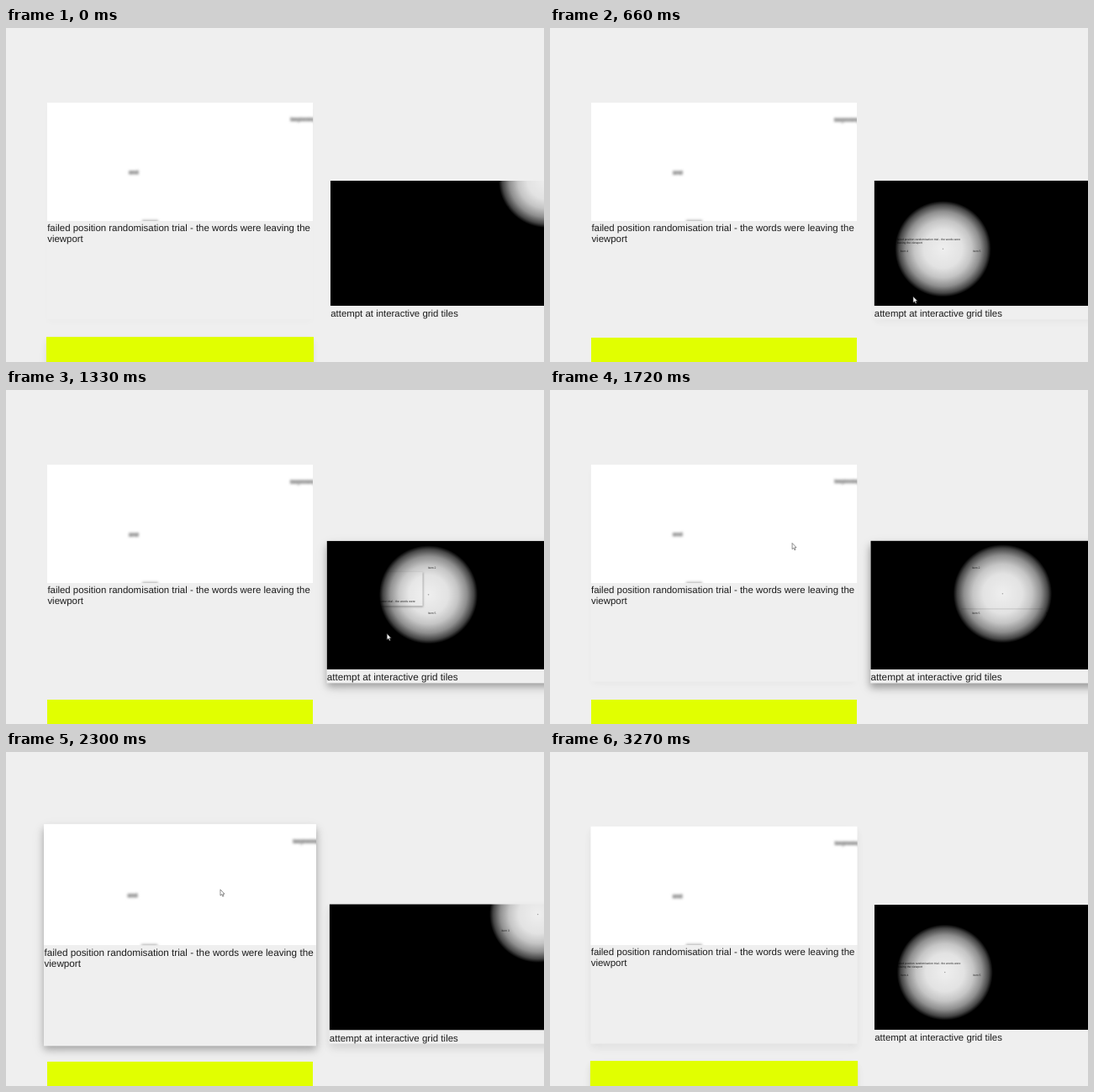
Animation of 640x398 px, one loop 3370 ms. Source, as an HTML page:

```html
<!DOCTYPE html>
<html lang="en">
<head>
<meta charset="utf-8">
<title>Hover cards</title>
<style>
html, body { margin: 0; width: 100%; height: 100%; overflow: hidden; background: #efefef; }
body { position: relative; font: 11.43px/13.2px "Liberation Sans", Arial, sans-serif; color: #1c1c1c; text-rendering: geometricPrecision; }
.card { position: absolute; background: #efefef; }
.card svg { display: block; }
p { position: absolute; margin: 0; white-space: nowrap; }
#left { left: 49px; top: 89px; width: 316px; height: 258px; }
#left p { left: .4px; top: 144.2px; }
#right { left: 386px; top: 182px; width: 317px; height: 165px; }
#right p { left: .2px; top: 152.5px; }
#yellow { left: 49px; top: 369px; width: 316px; height: 258px; background: #e1ff00; }
#pointer { position: absolute; left: 0; top: 0; overflow: visible; fill: #fff; stroke: #444; stroke-width: .6; }
</style>
</head>
<body>
<div class="card" id="yellow"></div>

<div class="card" id="right">
  <svg width="317" height="149" viewBox="386 182 317 149">
    <defs>
      <radialGradient id="spot" gradientUnits="userSpaceOnUse" r="57">
        <stop offset="0" stop-opacity=".03"/>
        <stop offset=".4" stop-opacity=".08"/>
        <stop offset=".6" stop-opacity=".2"/>
        <stop offset=".78" stop-opacity=".42"/>
        <stop offset=".92" stop-opacity=".72"/>
        <stop offset="1"/>
      </radialGradient>
      <filter id="soft"><feGaussianBlur stdDeviation="1"/></filter>
    </defs>
    <rect x="386" y="182" width="317" height="149" fill="#f6f6f6"/>
    <g id="labels" font-size="3.4" fill="#333"></g>
    <g id="mini">
      <rect x="411" y="219" width="86.5" height="39.5" fill="#999" filter="url(#soft)"/>
      <rect x="410" y="218" width="87" height="39.5" fill="#fafafa"/>
    </g>
    <g id="note" font-size="3.4" fill="#222">
      <text x="413" y="253">failed position randomisation trial - the words were</text>
      <text x="413" y="257">leaving the viewport</text>
    </g>
    <path id="rule" d="M491 261H585" stroke="#bbb" stroke-width=".6"/>
    <circle id="dot" r=".8" fill="#aaa"/>
    <rect x="386" y="182" width="317" height="149" fill="url(#spot)"/>
  </svg>
  <p>attempt at interactive grid tiles</p>
</div>

<div class="card" id="left">
  <svg width="316" height="141" viewBox="49 89 316 141">
    <defs><filter id="blur" x="-50%" y="-100%" width="200%" height="300%"><feGaussianBlur stdDeviation="1.4"/></filter></defs>
    <rect x="49" y="89" width="316" height="141" fill="#fff"/>
    <g filter="url(#blur)" font-size="7" fill="#777">
      <path d="M338 109.2H368M146 172.3H158M162 231H181" stroke="#b4b4b4" stroke-width="4.6"/>
      <text x="338" y="111.5">beginning</text>
      <text x="146" y="174.5">and</text>
    </g>
  </svg>
  <p>failed position randomisation trial - the words were leaving the<br>viewport</p>
</div>

<svg id="pointer" width="10" height="12">
  <path id="arrow" d="M0 0V7.2L1.7 5.7L2.8 8.3L4 7.8L2.9 5.3H5Z"/>
  <path id="hand" d="M-.7 0Q0-1 .8 0V3L3 3.7V6L2 8.5H-1.2L-3 5.3L-2.3 4.5L-.7 5.5Z"/>
</svg>

<script>
const LOOP = 3370, CLIP = 2610, STEP = 95.8, EASE = 1000, GROWTH = .03;
const $ = id => document.getElementById(id);

// When the pointer enters and leaves each card
const hovers = { left: [1550, 2500], right: [490, 1650], yellow: [2670, 2830] };

// Key points: [time, x, y]
const spotPath = [[0, 643, 181], [270, 588.5, 215], [660, 468.5, 263], [1330, 503, 244.6], [1720, 538, 243.6], [2300, 632, 194], [CLIP, 643, 181]];
const pointerPath = [[660, 432, 320], [1330, 455, 292], [1720, 289, 183], [2300, 255, 164], [2880, 333, 387]];

function smooth(u) {
  u = Math.min(1, Math.max(0, u));
  return u * u * (3 - 2 * u);
}
const pulse = (t, from, to, length) => smooth((t - from) / length) - smooth((t - to) / length);

// Point on a smooth curve through the keys, at rest at both ends
function along(keys, t) {
  const last = keys.length - 1;
  t = Math.min(keys[last][0], Math.max(keys[0][0], t));
  const j = Math.max(1, keys.findIndex(k => k[0] >= t));
  const a = keys[j - 1], b = keys[j], h = b[0] - a[0], u = (t - a[0]) / h, v = 1 - u;
  return [1, 2].map(c => {
    const slope = i => i % last ? (keys[i + 1][c] - keys[i - 1][c]) / (keys[i + 1][0] - keys[i - 1][0]) : 0;
    return a[c] + (b[c] - a[c]) * smooth(u) + h * u * v * (v * slope(j - 1) - u * slope(j));
  });
}

for (let i = 0; i < 9; i++) {
  const x = 417 + i % 3 * 86, y = 214.5 + Math.floor(i / 3) * 52.5;
  $('labels').innerHTML += `<text x="${x}" y="${y}">Item ${i + 1}</text>`;
}

function show(id, on) {
  $(id).style.display = on ? '' : 'none';
}

function drawCard(id, t) {
  const [enter, leave] = hovers[id], style = $(id).style;
  // The tail of a hover carries over into the next loop
  const lift = pulse(t, enter, leave, EASE) + pulse(t + LOOP, enter, leave, EASE);
  style.transform = `scale(${1 + GROWTH * lift})`;
  style.boxShadow = `0 5px 8px rgba(0,0,0,${.3 * lift}), 0 6px 15px rgba(0,0,0,${.12 * lift})`;
}

function drawSpot(t) {
  const [x, y] = along(spotPath, t);
  for (const id of ['spot', 'dot']) {
    $(id).setAttribute('cx', x);
    $(id).setAttribute('cy', y);
  }
  $('mini').setAttribute('opacity', pulse(t, 900, 1400, 250));
  show('note', t < 1600);
  show('rule', t > 1600 && t < 2000);
}

function drawPointer(t) {
  const [x, y] = along(pointerPath, t), hand = y > 369;
  $('pointer').style.transform = `translate(${x}px,${y}px)`;
  show('pointer', t > 560 && t < 2960);
  show('arrow', !hand);
  show('hand', hand);
}

function frame() {
  // Moves in steps, like a screen recording
  const step = Math.min(34, Math.floor(performance.now() % LOOP / STEP + .12));
  const t = step * STEP;
  for (const id in hovers) drawCard(id, t);
  drawSpot(t % CLIP);
  drawPointer(t);
  requestAnimationFrame(frame);
}
frame();
</script>
</body>
</html>
```
